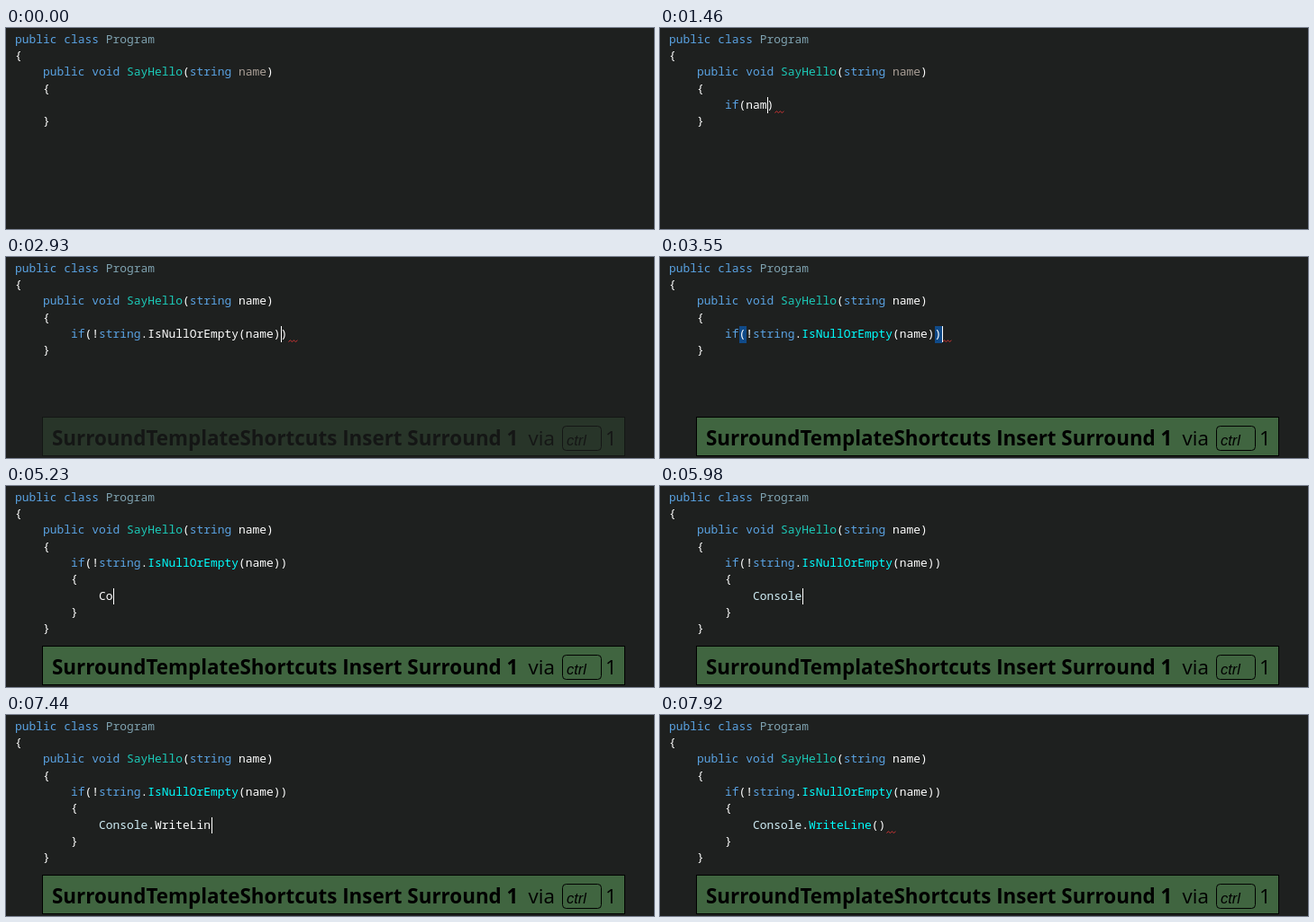
Write an HTML page with a canvas that moves like this. It is 719 by 224 pixels and loops after 8000 ms.

```html
<!DOCTYPE html>
<html lang="en">
<head>
<meta charset="utf-8">
<title>Surround template</title>
<style>
  html, body { margin: 0; width: 100%; height: 100%; overflow: hidden; background: #1e201f; }
  canvas, svg { position: absolute; left: 0; top: 0; }
  .label { font: 22.4px "Open Sans", "Noto Sans", sans-serif; }
  .command { font-weight: 700; }
  .key { font: italic 16.5px "Liberation Sans", Arial, sans-serif; }
</style>
</head>
<body>
<canvas id="editor" width="719" height="224"></canvas>
<svg width="719" height="224">
  <g id="banner" opacity="0">
    <rect x="40.5" y="178.5" width="646" height="43" fill="#406540" stroke="#000"/>
    <text class="label command" x="51" y="210">SurroundTemplateShortcuts Insert Surround 1</text>
    <text class="label" x="579.5" y="210">via</text>
    <rect x="617.5" y="188.5" width="43" height="27" rx="4" fill="none" stroke="#000"/>
    <text class="key" x="622" y="210">ctrl</text>
    <text class="label" x="665" y="210">1</text>
  </g>
</svg>
<script>
const DURATION = 8000, LEFT = 10.7, COLUMN = 7.75, BACKGROUND = '#1e201f';
const ctx = document.getElementById('editor').getContext('2d');
const banner = document.getElementById('banner');

const KEYWORD = '#5aa2e2', PLAIN = '#fff', METHOD = '#0ff';
const COLORS = {
  public: KEYWORD, class: KEYWORD, void: KEYWORD, string: KEYWORD, if: KEYWORD,
  Program: '#7fa2b0', SayHello: '#1ccbb9', Console: '#d0eef6'
};

const initial = {
  condition: '', body: '', expanded: false, caret: null, squiggle: null,
  selected: false, braces: 0, used: false, called: false, resolved: false, banner: 0
};
const timeline = [];
const at = (time, change) => timeline.push({ time, change });

// Typing clears the squiggle; "inside" counts the characters right of the caret.
const typeCondition = (time, condition, inside = 0, extra = {}) =>
  at(time, { condition, caret: [4, 8 + condition.length - inside], squiggle: null, ...extra });
const typeBody = (time, body, inside = 0, extra = {}) =>
  at(time, { body, caret: [6, 12 + body.length - inside], squiggle: null, ...extra });
const squiggle = (time, row, from, to = from, extra = {}) =>
  at(time, { squiggle: [row, from, to], ...extra });

at(240, { caret: [4, 8] });
typeCondition(830, 'i');
typeCondition(920, 'if', 0, { squiggle: [4, 10, 10] });
typeCondition(1070, 'if()', 1);
typeCondition(1230, 'if(n)', 1);
squiggle(1310, 4, 13);
typeCondition(1380, 'if(na)', 1, { squiggle: [4, 14, 14] });
typeCondition(1460, 'if(nam)', 1, { squiggle: [4, 15, 15] });
typeCondition(1550, 'if(name)', 1, { squiggle: [4, 16, 16] });
at(1640, { used: true });
at(1790, { caret: null });
squiggle(1850, 4, 11, 13.8);
at(2310, { selected: true, squiggle: null });
squiggle(2500, 4, 11, 13.8);

const CHECK = 'if(!string.IsNullOrEmpty(name))';
typeCondition(2930, CHECK, 1, { selected: false, squiggle: [4, 39, 39], banner: 0.3 });
at(3000, { banner: 0.65 });
at(3070, { banner: 1 });
at(3250, { called: true });
at(3330, { caret: [4, 39] });
at(3400, { braces: 18 });
at(3550, { braces: 19 });
typeCondition(3820, CHECK + ' ', 0, { braces: 0 });
typeCondition(4190, CHECK + ' {}', 1);
at(4370, { caret: null });
typeCondition(4520, CHECK, 0, { expanded: true, caret: [6, 12] });

typeBody(4860, 'C');
squiggle(4950, 6, 13);
typeBody(5230, 'Co');
squiggle(5320, 6, 14);
typeBody(5400, 'Con');
squiggle(5470, 6, 15);
typeBody(5650, 'Cons');
squiggle(5730, 6, 16);
typeBody(5810, 'Conso');
typeBody(5890, 'Consol');
typeBody(5970, 'Console');
squiggle(6050, 6, 19);
typeBody(6130, 'Console.');
typeBody(6210, 'Console.W');
squiggle(6290, 6, 21);
typeBody(6440, 'Console.Wr');
typeBody(6530, 'Console.Wri');
typeBody(6620, 'Console.Writ');
typeBody(6710, 'Console.Write', 0, { resolved: true, squiggle: [6, 20, 25] });
typeBody(6860, 'Console.WriteL', 0, { resolved: false });
squiggle(6950, 6, 20, 26);
typeBody(7130, 'Console.WriteLi');
squiggle(7280, 6, 20, 27);
typeBody(7440, 'Console.WriteLin');
typeBody(7520, 'Console.WriteLine');
typeBody(7600, 'Console.WriteLine()', 1);
at(7670, { resolved: true });
at(7830, { caret: null });
squiggle(7920, 6, 31);

const columnX = column => LEFT + column * COLUMN;
const rowTop = row => Math.floor(4 + 18.34 * row);

function block(row, from, to, color, height) {
  ctx.fillStyle = color;
  ctx.fillRect(Math.round(columnX(from)), rowTop(row), Math.round((to - from) * COLUMN), height);
}

function write(row, column, text, methodsOn = false, overrides = {}) {
  ctx.font = '500 12.92px "Noto Sans Mono", "DejaVu Sans Mono", monospace';
  for (const { 0: token, index } of text.matchAll(/\w+|[^\w\s]/g)) {
    const isMethod = methodsOn && /^(IsNull|Write)/.test(token);
    ctx.fillStyle = isMethod ? METHOD : overrides[token] || COLORS[token] || PLAIN;
    ctx.fillText(token, columnX(column + index) - 0.6, rowTop(row) + 13);
  }
}

function drawSquiggle([row, from, to]) {
  const start = columnX(from) + 0.5, end = columnX(to) + 10.5, y = rowTop(row) + 15.8;
  ctx.strokeStyle = '#cf3434';
  ctx.lineWidth = 1;
  ctx.beginPath();
  for (let x = start, i = 0; x <= end; x += 2, i++) ctx.lineTo(x, y + (i % 2 ? 0 : 1.7));
  ctx.stroke();
}

function draw(state) {
  ctx.fillStyle = BACKGROUND;
  ctx.fillRect(0, 0, 719, 224);
  if (state.selected) block(4, 11, 15, '#264f78', 19);
  if (state.braces) for (const column of [10, 38]) block(4, column, column + 1, '#104a88', state.braces);

  write(0, 0, 'public class Program');
  write(1, 0, '{');
  write(2, 4, 'public void SayHello(string name)', false, state.used ? {} : { name: '#aba098' });
  write(3, 4, '{');
  write(4, 8, state.condition, state.called);
  if (state.expanded) {
    write(5, 8, '{');
    write(6, 12, state.body, state.resolved);
    write(7, 8, '}');
  }
  write(state.expanded ? 8 : 5, 4, '}');

  if (state.squiggle) drawSquiggle(state.squiggle);
  if (state.caret) {
    const [row, column] = state.caret;
    ctx.fillStyle = '#fff';
    ctx.fillRect(Math.round(columnX(column)), rowTop(row), 1, 18);
  }
  banner.setAttribute('opacity', state.banner);
}

function frame() {
  const time = performance.now() % DURATION;
  const past = timeline.filter(event => event.time <= time).map(event => event.change);
  draw(Object.assign({}, initial, ...past));
  requestAnimationFrame(frame);
}
frame();
</script>
</body>
</html>
```
